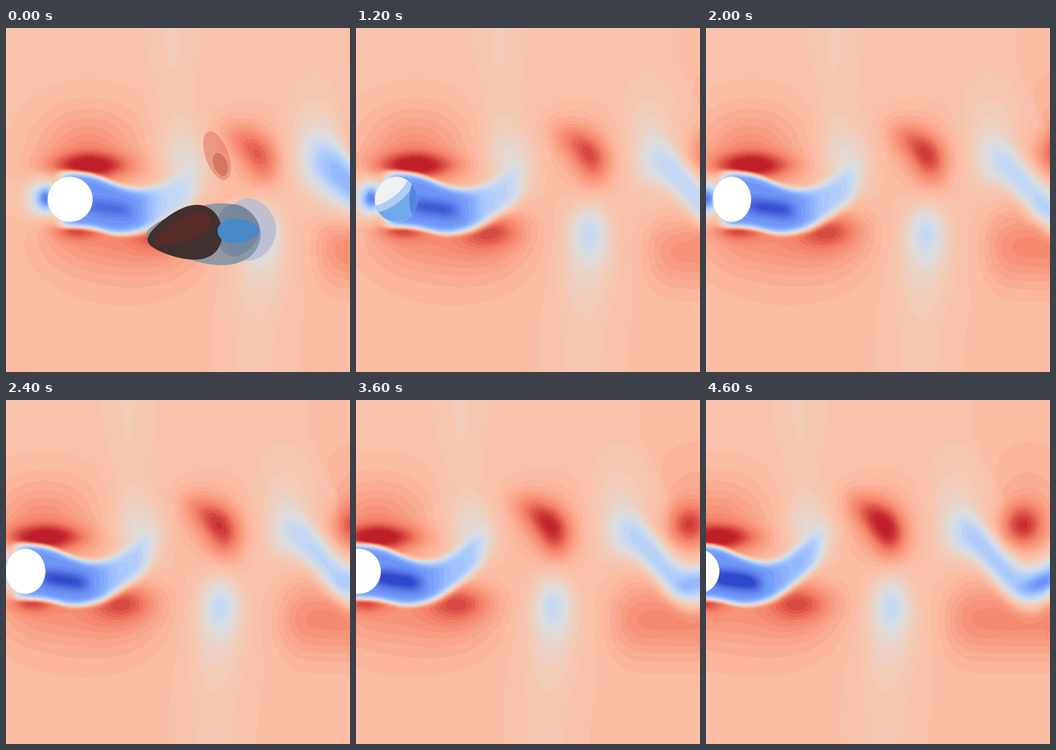
Write a matplotlib script that moves like this. It is 512x512 px and loops after 4.8 s.

```python
import numpy as np
import matplotlib.pyplot as plt
from matplotlib.animation import FuncAnimation
from matplotlib.colors import LinearSegmentedColormap
from matplotlib.patches import Ellipse, Polygon

SIZE, FRAMES, INTERVAL = 512, 24, 200
x = np.arange(SIZE) + 0.5
y = x[:, None]

flow_map = LinearSegmentedColormap.from_list("flow", [
    (0.00, "#3248cb"), (0.20, "#739bfa"), (0.30, "#a0c3ff"), (0.40, "#c6d8f5"),
    (0.48, "#dddede"), (0.60, "#f6c9b2"), (0.66, "#fdbca1"), (0.82, "#f48065"),
    (0.96, "#c72b30"), (1.00, "#bf1e2b")], N=44)


def bump(x0, y0, sx, sy, angle=0):
    if angle == 0:
        return np.exp(-((x - x0) / sx) ** 2 / 2) * np.exp(-((y - y0) / sy) ** 2 / 2)
    c, s = np.cos(np.radians(angle)), np.sin(np.radians(angle))
    u = (x - x0) * c + (y - y0) * s
    v = (y - y0) * c - (x - x0) * s
    return np.exp(-((u / sx) ** 2 + (v / sy) ** 2) / 2)


def step(u):
    return 1 / (1 + np.exp(-np.clip(u, -40, 40)))


def ribbon(mid, half, power):
    return np.exp(-(np.abs(y - mid) / half) ** power)


def cylinder(k):
    """Centre x and width; it drifts left, slowing down."""
    return 95.5 - 6.4 * k + 0.072 * k ** 2, 67 - 10 * np.exp(-((k - 10) / 4) ** 2)


def around_cylinder(cx, k):
    s = x - cx
    low = cx + 138 + 0.7 * k
    v = 0.27 * bump(cx + 30, 205, 42, 13) + 0.12 * bump(cx + 26, 192, 50, 38)
    v += 0.05 * bump(cx + 30, 150, 70, 50)
    v += 0.18 * bump(cx + 8, 300, 25, 11) + 0.09 * bump(cx + 20, 315, 50, 32)
    v += 0.15 * bump(low, 302, 32, 18) + 0.12 * bump(low - 15, 312, 52, 38)
    v += 0.03 * bump(cx + 70, 365, 85, 45)
    v -= 0.27 * bump(cx - 41, 253, 17, 19) + 0.25 * bump(cx - 35, 254, 9, 13)
    v -= 0.03 * np.exp(-((s - 152) / 30) ** 2) * step((200 - y) / 25)
    v -= 0.11 * bump(cx + 170, 195, 25, 33)
    return v


def downstream(k):
    crest = 376 - 4.75 * k
    drop = 380 - 5.8 * k + 0.055 * k ** 2
    grow = 0.9 + 0.02 * k
    v = grow * (0.12 * bump(crest - 20, 170, 30, 17, 35)
                + 0.14 * bump(crest + 5, 202, 18, 26, -12)
                + 0.08 * bump(crest - 8, 180, 40, 42))
    v -= 0.18 * bump(drop, 304, 19, 29) + 0.06 * bump(drop, 345, 30, 48)
    v -= 0.04 * np.exp(-((x - drop + 10) / 45) ** 2) * step((y - 330) / 25)

    low, top = 470 - 4.6 * k, 535 - 0.12 * k ** 2
    v += 0.15 * step((x - low) / 13) * np.exp(-((y - 325) / 58) ** 2)
    v += (0.13 + 0.005 * k) * bump(top, 187, 22, 22) + 0.06 * bump(top + 8, 170, 34, 50)
    edge = 510 - 4.9 * k + 45 * np.clip((y - 50) / 100, 0, 1)
    return v + 0.035 * step((x - edge) / 2) * step((190 - y) / 20)


def field(k):
    cx, _ = cylinder(k)
    s = x - cx
    v = 0.617 + 0.025 * step((y - 260) / 70) + around_cylinder(cx, k) + downstream(k)

    # Blue band entering from the right, led by a short-lived vortex
    g = x - (460 - 3.8 * k)
    v -= 0.08 * np.exp(-(g / 28) ** 2 / 2) * np.exp(-((y - 170) / 45) ** 2 / 2)
    m = ribbon(236 - 40 * np.cos(np.pi * g / 110), 33, 2.4) * step((g + 4) / 9)
    v = v * (1 - m) + (0.40 - 0.06 * (k / 23) ** 2) * m
    m = np.exp(-((k - 2) / 2.4) ** 2) * bump(498 - 4 * k, 225 + 10 * k, 40, 25, 58) ** 0.8
    v = v * (1 - m) + 0.14 * m
    v -= 0.15 * (k / 23) ** 2 * bump(500, 272, 24, 11, -22)

    # Near wake: a ribbon that sinks, then turns upward
    climb = (0.6 + 0.012 * k) * 12 * np.logaddexp(0, (s - 118) / 12)
    mid = 255 + 19 * step((s - 52) / 14) - climb
    half = 42 - (11 + 0.17 * k) * step((s - 80) / 20)
    power = 3 + 10 * step((90 - s) / 25)
    tail = 0.4 - 0.005 * k
    depth = 0.2 + (tail - 0.2) * step((s - 122) / 9) + (0.5 - tail) * step((s - 188) / 8)
    m = ribbon(mid, half, power) * step((s + 14) / 5) * step((190 - s) / 8)
    v = v * (1 - m) + depth * m
    core = np.exp(-((s - 57) / 36) ** 4 - ((y - 268 - 0.14 * (s - 57)) / 13) ** 2)
    return np.clip(v - (0.1 + 0.007 * k) * core, 0, 1)


def leaf(x0, y0, a, b, taper=0.0, angle=0):
    """Oval outline, pinched towards its left end by taper."""
    t = np.linspace(0, 2 * np.pi, 80)
    u, v = a * np.cos(t), b * np.sin(t) * (1 + taper * np.cos(t))
    c, s = np.cos(np.radians(angle)), np.sin(np.radians(angle))
    return np.column_stack([x0 + u * c - v * s, y0 + u * s + v * c])


# Leftover shapes of the opening
GHOST = [
    (leaf(364, 300, 38, 46, -0.1), "#b6b8ce", 0.75),
    (leaf(294, 307, 85, 43, 0.4), "#8494a3", 0.9),
    (leaf(345, 301, 32, 38, -0.2), "#70829b", 0.7),
    (leaf(266, 307, 56, 38, 0.4, -10), "#40302f", 1),
    (leaf(262, 302, 46, 17, 0.4, -25), "#622924", 0.7),
    (leaf(346, 302, 31, 18, -0.2), "#4889c8", 1),
    (leaf(314, 190, 38, 17, 0, 70), "#e07860", 0.55),
    (leaf(319, 203, 18, 10, 0, 70), "#c8604f", 0.6),
]
# Tints inside the cylinder, relative to its centre
TINT = [
    (leaf(0, 0, 40, 40), "#70a8ec"),
    (leaf(-8, -12, 44, 20, 0, -38), "#acceF4"),
    (leaf(-13, -17, 38, 16, 0, -38), "#eef0f2"),
    (leaf(32, 0, 12, 32), "#5486dc"),
]

fig = plt.figure(figsize=(5.12, 5.12), dpi=100)
ax = fig.add_axes([0, 0, 1, 1])
ax.axis("off")
img = ax.imshow(field(0), cmap=flow_map, vmin=0, vmax=1,
                extent=(0, SIZE, SIZE, 0), interpolation="nearest", aspect="auto")
ghost = [ax.add_patch(Polygon(pts, fc=c, lw=0, zorder=2)) for pts, c, _ in GHOST]
disc = ax.add_patch(Ellipse((0, 0), 67, 67, fc="white", lw=0, zorder=3))
tints = [ax.add_patch(Polygon(pts, fc=c, lw=0, zorder=4)) for pts, c in TINT]
ax.set(xlim=(0, SIZE), ylim=(SIZE, 0))


def update(k):
    cx, width = cylinder(k)
    centre = (cx, 255)
    img.set_data(field(k))
    disc.set_center(centre)
    disc.set_width(width)
    for patch, (_, _, alpha) in zip(ghost, GHOST):
        patch.set_alpha(alpha * max(0, 1 - k / 2))
    strength = (k / 6) ** 2 if k < 7 else 0
    for patch, (pts, _) in zip(tints, TINT):
        patch.set_xy(pts + centre)
        patch.set_alpha(strength)
        patch.set_clip_path(disc)
    return [img, disc, *ghost, *tints]


anim = FuncAnimation(fig, update, frames=FRAMES, interval=INTERVAL,
                     repeat=True, repeat_delay=0, blit=False)
plt.show()
```
